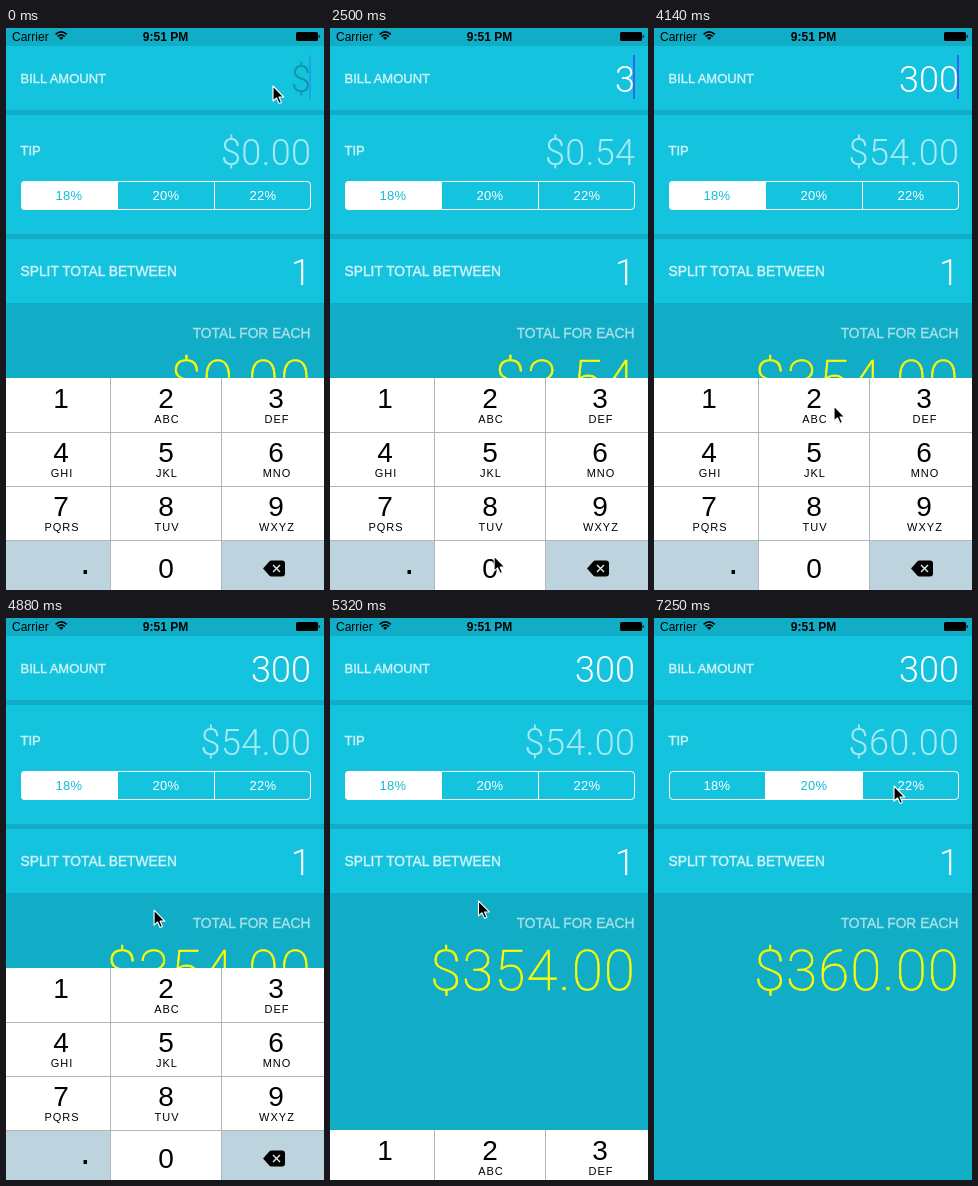
Recreate the animation shown at these times as an HTML page. Size 318 by 562 pixels, loop 8000 ms.

```html
<!DOCTYPE html>
<html lang="en">
<head>
<meta charset="utf-8">
<title>Tip calculator</title>
<style>
  html, body { margin: 0; width: 100%; height: 100%; overflow: hidden; background: #11acc5; }
  svg { display: block; width: 318px; height: 562px; }
  text { font-family: "Liberation Sans", Arial, sans-serif; white-space: pre; }
  .label { font-size: 13px; fill: #fff; stroke: #fff; stroke-width: .35px; opacity: .82; }
  .big { font-size: 13.8px; }
  .num { font: 300 36px Roboto, sans-serif; fill: #fff; text-anchor: end; }
  .total { font: 100 56px Roboto, sans-serif; fill: #ff0; stroke: #ff0; stroke-width: .7px; text-anchor: end; letter-spacing: 1.4px; }
  .mid { text-anchor: middle; }
  .seg { font-size: 13px; letter-spacing: .3px; }
  .digit { font-size: 28px; }
  .abc { font-size: 11px; letter-spacing: 1px; }
  .status { font-size: 12px; }
</style>
</head>
<body>
<svg viewBox="0 0 318 562">
  <defs>
    <clipPath id="round"><rect x="15" y="153" width="290" height="29" rx="4"/></clipPath>
  </defs>
  <rect width="318" height="562" fill="#11acc5"/>
  <g fill="#14c4df">
    <rect y="18" width="318" height="64"/>
    <rect y="87" width="318" height="119"/>
    <rect y="211" width="318" height="64"/>
  </g>

  <text class="status" x="6" y="12.5">Carrier</text>
  <path d="M49.6 6.4Q55.2 1.4 60.8 6.4M51.6 8.6Q55.2 5.3 58.8 8.6" fill="none" stroke="#000" stroke-width="1.6"/>
  <path d="M53 9.7Q55.2 8 57.4 9.7L55.2 12Z"/>
  <text class="status mid" x="159.5" y="12.5" font-weight="700">9:51 PM</text>
  <rect x="290" y="4" width="22" height="9" rx="1.5"/>
  <path d="M312.7 6.5Q315 8.5 312.7 10.5Z"/>

  <text class="label" x="14.5" y="54.5">BILL AMOUNT</text>
  <text class="label" x="14.5" y="127">TIP</text>
  <text class="label big" x="14.5" y="247.5">SPLIT TOTAL BETWEEN</text>
  <text class="label big" x="304.5" y="309.5" text-anchor="end" style="opacity:.64">TOTAL FOR EACH</text>

  <text class="num" id="bill" x="305" y="63.5"></text>
  <rect id="caret" x="303" y="27" width="2" height="44" fill="#3565e8"/>
  <text class="num" id="tip" x="305.4" y="137" fill-opacity=".62" letter-spacing=".4"></text>
  <text class="num" x="305" y="257">1</text>
  <text class="total" id="total" x="306" y="372"></text>

  <g id="segs" clip-path="url(#round)"></g>
  <rect x="15.5" y="153.5" width="289" height="28" rx="3.5" fill="none" stroke="#fff"/>
  <path d="M111.5 153V182M208.5 153V182" stroke="#fff"/>

  <g id="pad">
    <rect y="350" width="318" height="212" fill="#fff"/>
    <path d="M0 512H104V562H0ZM216 512H318V562H216Z" fill="#bdd4df"/>
    <rect id="zero" x="105" y="513" width="110" height="49" fill="#bdd4df"/>
    <path d="M0 404.5H318M0 458.5H318M0 512.5H318M104.5 350V562M215.5 350V562" stroke="#b2b6b9"/>
    <text class="digit mid" x="160" y="549.5">0</text>
    <rect x="77.5" y="542" width="3.5" height="4"/>
    <path d="M257 540.5L263.5 533.2Q264.3 532.5 265.5 532.5H276Q279 532.5 279 535.5V545.5Q279 548.5 276 548.5H265.5Q264.3 548.5 263.5 547.8Z"/>
    <path d="M267 537L274 544M274 537L267 544" stroke="#e4eef3" stroke-width="1.4"/>
  </g>
  <path id="pointer" d="M0 0V15L3.5 11.8L6 17.4L8.4 16.4L6 11H10.8Z"
    stroke="#fff" stroke-width="1.1" stroke-linejoin="round"/>
</svg>
<script>
const $ = id => document.getElementById(id);
const LOOP = 8000, TICK = 147;  // the screen refreshes once per tick
const AMOUNT = "300", KEYS = [1910, 2790, 3670];
const DISMISS = 5030, TOUCH = 6320, PICK = TOUCH + TICK;

const home = { x: 267, y: 58 };
const moves = [
  { from: 0, to: 1170, x: 253, y: 217 },
  { from: 1180, to: 1600, x: 238, y: 369 },
  { from: 2060, to: 2570, x: 160, y: 537 },
  { from: 3980, to: 4110, x: 180, y: 378 },
  { from: 4120, to: 4870, x: 148, y: 292 },
  { from: 5150, to: 6020, x: 155, y: 165 },
  { from: 6800, to: 7200, x: 240, y: 168 }
];

const clamp = v => Math.max(0, Math.min(1, v));
const smooth = p => p * p * (3 - 2 * p);

function pointerAt(t) {
  let { x, y } = home;
  for (const m of moves) {
    const p = smooth(clamp((t - m.from) / (m.to - m.from)));
    x += (m.x - x) * p;
    y += (m.y - y) * p;
  }
  return `translate(${x} ${y})`;
}

// The blink restarts with every key
function caretAt(t, lastKey) {
  if (t >= DISMISS) return 0;
  return clamp(.5 + 3 * Math.cos(2 * Math.PI * (t - lastKey - 300) / 1300));
}

function add(parent, tag, attrs, text = "") {
  const el = document.createElementNS("http://www.w3.org/2000/svg", tag);
  for (const k in attrs) el.setAttribute(k, attrs[k]);
  el.textContent = text;
  parent.appendChild(el);
  return el;
}

const segs = [18, 20, 22].map((rate, i) => ({
  rate,
  box: add($("segs"), "rect", { x: 14.5 + 97 * i, y: 153, width: 97, height: 29, fill: "#fff" }),
  text: add($("segs"), "text", { class: "seg mid", x: 63 + 97 * i, y: 172 }, rate + "%")
}));

const cols = [55, 160, 270];
["", "ABC", "DEF", "GHI", "JKL", "MNO", "PQRS", "TUV", "WXYZ"].forEach((abc, i) => {
  const x = cols[i % 3], y = 380 + 54 * Math.floor(i / 3);
  add($("pad"), "text", { class: "digit mid", x, y }, i + 1);
  add($("pad"), "text", { class: "abc mid", x: x + 1, y: y + 15 }, abc);
});

function draw(time) {
  const t = Math.floor(time / TICK) * TICK;
  const count = KEYS.filter(k => t >= k).length;
  const bill = AMOUNT.slice(0, count);
  const pick = t >= PICK ? 1 : 0;
  const tip = bill * segs[pick].rate / 100;

  $("bill").textContent = bill || "$";
  $("bill").style.fill = bill ? "#fff" : "rgba(0,0,0,.23)";
  $("tip").textContent = "$" + tip.toFixed(2);
  $("total").textContent = "$" + (+bill + tip).toFixed(2);
  $("caret").setAttribute("opacity", caretAt(t, count ? KEYS[count - 1] : -635));

  segs.forEach((s, i) => {
    const touched = i === 1 && t >= TOUCH;
    s.box.setAttribute("opacity", i === pick ? 1 : touched ? .15 : 0);
    s.text.setAttribute("fill", i === pick ? "#14bcd7" : "#fff");
  });

  const pressed = t < KEYS[2] && t >= KEYS[2] - TICK;
  $("zero").setAttribute("opacity", pressed ? 1 : 0);
  const drop = 212 * clamp((t - DISMISS) / 300) ** 2;
  $("pad").setAttribute("transform", `translate(0 ${Math.round(drop)})`);
  $("pointer").setAttribute("transform", pointerAt(t));
}

const start = performance.now();
function frame() {
  draw((performance.now() - start) % LOOP);
  requestAnimationFrame(frame);
}
frame();
</script>
</body>
</html>
```
